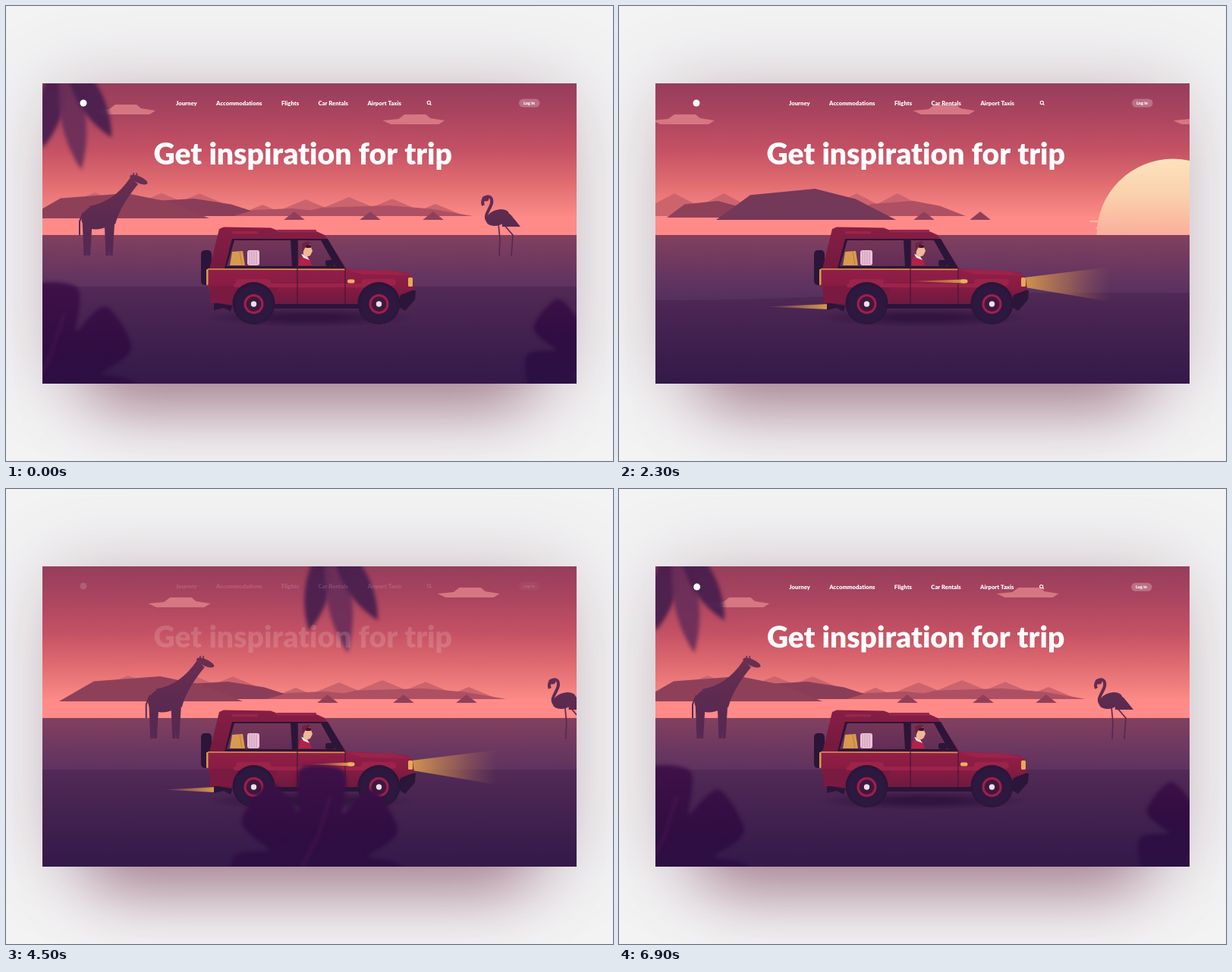
Recreate the animation shown at these times as an HTML page with a canvas. Size 800 by 600 pixels, loop 7 s.

```html
<!DOCTYPE html>
<html lang="en">
<head>
<meta charset="utf-8">
<title>Get inspiration for trip</title>
<style>
html, body { margin: 0; width: 100%; height: 100%; overflow: hidden; background: #f2f2f3; }
canvas { display: block; width: 800px; height: 600px; }
</style>
</head>
<body>
<canvas id="stage" width="800" height="600"></canvas>
<script>
const ctx = document.getElementById('stage').getContext('2d');
const LOOP = 7000, TRIP = 1708, NEAR = 8;

// ---------- helpers ----------
const clamp = v => Math.max(0, Math.min(1, v));
const ramp = (t, a, b) => { const x = clamp((t - a) / (b - a)); return x * x * (3 - 2 * x); };
const mix = (a, b, k) => a + (b - a) * k;
const bell = (x, center, width) => Math.exp(-(((x - center) / width) ** 2));

function gradient(x0, y0, x1, y1, ...colors) {
  const g = ctx.createLinearGradient(x0, y0, x1, y1);
  colors.forEach((c, i) => g.addColorStop(i / (colors.length - 1), c));
  return g;
}
function trace(p) {
  ctx.beginPath();
  for (let i = 0; i < p.length; i += 2) ctx.lineTo(p[i], p[i + 1]);
}
function poly(fill, ...p) {
  trace(p);
  ctx.fillStyle = fill;
  ctx.fill();
}
function line(color, width, ...p) {
  trace(p);
  ctx.strokeStyle = color;
  ctx.lineWidth = width;
  ctx.stroke();
}
function disc(fill, x, y, rx, ry = rx, turn = 0) {
  ctx.beginPath();
  ctx.ellipse(x, y, rx, ry, turn, 0, Math.PI * 2);
  ctx.fillStyle = fill;
  ctx.fill();
}
function box(fill, x, y, w, h, r = 0) {
  ctx.beginPath();
  ctx.roundRect(x, y, w, h, r);
  ctx.fillStyle = fill;
  ctx.fill();
}
function at(x, y, draw) {
  ctx.save();
  ctx.translate(x, y);
  draw();
  ctx.restore();
}
// Draws text and returns its width.
function label(text, x, y, size) {
  ctx.font = `900 ${size}px Lato, sans-serif`;
  ctx.letterSpacing = '0.01px';
  ctx.fillStyle = '#fff';
  ctx.fillText(text, x, y);
  return ctx.measureText(text).width;
}

// ---------- motion ----------
function distance(t) {
  const u = clamp(t / 5015);
  const eased = u + .22 * u * (1 - u) ** 4;
  return TRIP * (1 - Math.cos(Math.PI * eased)) / 2;
}

// ---------- backdrop ----------
function glow(inset, drop, blur, color) {
  ctx.save();
  ctx.shadowColor = color;
  ctx.shadowBlur = blur;
  ctx.shadowOffsetY = drop;
  box('#a06a80', 48 + inset, 102 + inset / 2, 704 - 2 * inset, 396 - inset / 2, 40);
  ctx.restore();
}
function backdrop() {
  ctx.fillStyle = '#f3f3f4';
  ctx.fillRect(0, 0, 800, 600);
  glow(0, 0, 100, 'rgba(125,85,102,.3)');
  glow(62, 34, 84, 'rgba(125,65,90,.56)');
}

function sky() {
  ctx.fillStyle = gradient(0, 102, 0, 277, '#973d5c', '#ab4560', '#c45164', '#e06c71', '#fb8a86');
  ctx.fillRect(48, 102, 704, 175);
  ctx.fillStyle = '#ff8a88';
  ctx.fillRect(48, 277, 704, 25);
}
function sun() {
  ctx.beginPath();
  ctx.arc(1497, 302, 100.5, Math.PI, 0);
  ctx.fillStyle = gradient(0, 200, 0, 302, '#fce3bd', '#fad0ac', '#fbae9b');
  ctx.fill();
  for (const side of [-1, 1]) for (const i of [0, 1]) box(ctx.fillStyle, 1489 + side * (102 - 8 * i), 283 + 9 * i, 16, 2, 1);
}
function clouds(drift) {
  for (let i = 0; i < 7; i++) {
    const x = 156 + 343.3 * i + (i % 5 === 1 ? 38 : 0), y = i % 3 ? 156 : 143;
    at(x - drift, y, () => poly('rgba(226,132,138,.8)', -41, -5, -20, -7, -12, -13, 16, -13, 22, -8, 41, -5, 33, 0, -30, 0));
  }
}

// ---------- far hills ----------
const LIGHT = '#cc646e', RIDGE = '#ae5063', HILL = '#8f4059', DARK = '#743858';

function mound(fill, left, right, top, base) {
  const c = (left + right) / 2, half = (right - left) / 2, h = base - top;
  poly(fill, left, base, c - .62 * half, base - .8 * h, c + .1 * half, top, c + .55 * half, base - .67 * h, right, base);
}
function peak(fill, x, top, base, slope) {
  const half = (base - top) * slope;
  poly(fill, x - half, base, x, top, x + half, base);
}
const rock = x => peak(HILL, x, 271, 282, 1.25);

function homeHills() {
  [117, 205, 255].forEach(x => peak(LIGHT, x, 245 + x / 120, 277, 2.4));
  for (let x = 338; x < 580; x += 57) peak(LIGHT, x, 263 - 11 * Math.sin((x - 330) / 80), 277, 2.4);
  mound('#8a3d59', 130, 345, 254, 277);
  mound(RIDGE, 300, 440, 267, 277);
  mound(RIDGE, 370, 615, 263, 277);
  mound(HILL, 26, 268, 247, 280);
  [380, 480, 563].forEach(rock);
}
function middleHills() {
  [410, 475, 650, 704].forEach(x => peak(LIGHT, x, 247, 277, 1.9));
  mound(HILL, 400, 522, 257, 279);
  mound(RIDGE, 640, 794, 257, 277);
  mound(DARK, 465, 702, 241, 282);
  [739, 813].forEach(rock);
}

// ---------- middle distance ----------
const roadEdge = x => 370 + 8 * ramp(x, 1000, 1500) * (1 - ramp(x, 2950, 3200)) + 10 * bell(x, 1600, 260) + 10 * bell(x, 2640, 190);

function giraffe(fill) {
  disc(fill, 122, 278, 23, 16, -.25);
  ctx.beginPath();
  ctx.moveTo(109, 264);
  ctx.quadraticCurveTo(142, 259, 164, 226);
  ctx.lineTo(174, 235);
  ctx.quadraticCurveTo(150, 264, 144, 288);
  ctx.fill();
  disc(fill, 175, 229, 12.5, 4.5, .42);
  for (const x of [169, 173]) line(fill, 1.6, x, 226, x - 1, 220);
  for (const x of [104.5, 109, 133.5, 138.5]) poly(fill, x - 4, 280, x + 5, 280, x + 2, 329, x - 2, 329);
  line(fill, 2, 102, 272, 97, 284, 97, 302);
}
function flamingo(fill) {
  ctx.beginPath();
  ctx.moveTo(629, 263);
  ctx.bezierCurveTo(624, 250, 643, 246, 640, 260);
  ctx.bezierCurveTo(638, 269, 627, 278, 637, 285);
  ctx.strokeStyle = fill;
  ctx.lineWidth = 4;
  ctx.stroke();
  disc(fill, 632, 254, 4.5, 3.5);
  disc(fill, 648, 279, 16, 10, -.35);
  poly(fill, 652, 268, 665, 275, 678, 291, 654, 291);
  line(fill, 1.7, 649, 287, 651, 308, 650, 330);
  line(fill, 1.7, 655, 287, 668, 302, 666, 330);
}
function tree(x, top, k, fill) {
  box(fill, x - 1.2, top, 2.4, roadEdge(x) - top);
  for (let i = 0; i < 3; i++) {
    const w = (18 + 1.7 * i) * k;
    poly(fill, x, top + 30 * i * k, x + w, top + (48 + 29.5 * i) * k, x - w, top + (48 + 29.5 * i) * k);
  }
}
function wildlife() {
  const fill = gradient(0, 225, 0, 350, '#6a2e50', '#5a2a50', '#522753');
  [0, 2 * TRIP].forEach(x => at(x, 0, () => { giraffe(fill); flamingo(fill); }));
  at(1510, 0, () => { ctx.scale(-1, 1); giraffe(fill); });
  for (const [x, drop] of [[966, 0], [2575, 15]]) {
    tree(x, 237 + drop, 1, fill);
    tree(x + (drop ? 55 : 43), 280 + drop / 8, .7, fill);
  }
  box('#55284d', 3081.5, 290, 3, 86);
  box('#572846', 3051, 271.5, 45, 21.5, 3);
  box('#673052', 3079, 304, 41, 20, 3);
}
function road(shift) {
  ctx.beginPath();
  ctx.moveTo(48, 500);
  for (let x = 48; x <= 756; x += 6) ctx.lineTo(x, roadEdge(x + shift));
  ctx.lineTo(756, 500);
  ctx.fillStyle = gradient(0, 368, 0, 498, '#532a56', '#42214f', '#33194a');
  ctx.fill();
}

// ---------- car ----------
const INK = '#2b1538', GOLD = '#d89b4e', SEAM = '#451638', TRIM = '#9c234a';

function wheel(x, roll) {
  const y = 393;
  disc(INK, x, y - 1, 28);
  disc('#2d183f', x, y, 24.5);
  ctx.setLineDash([4, 2.4]);
  ctx.lineDashOffset = -roll;
  ctx.beginPath();
  ctx.arc(x, y, 25, 0, Math.PI * 2);
  ctx.strokeStyle = '#2d183f';
  ctx.lineWidth = 2.2;
  ctx.stroke();
  ctx.setLineDash([]);
  disc('#a11f4a', x, y, 13);
  disc('#40183f', x, y, 10);
  disc('#ebe0e8', x, y, 3.7);
}
function luggage() {
  poly(GOLD, 298, 324, 312, 323, 315, 342, 295, 342);
  line('#b87b42', 1, 308, 324, 311, 341);
  box('#e9c3d6', 318, 322, 16, 20, 3);
  for (let x = 321; x < 333; x += 3) line('#c38aad', .8, x, 323, x, 341);
}
function driver(tilt) {
  poly('#b52049', 385, 342, 388, 330, 400, 333, 403, 342);
  poly('#f4e6ea', 389, 327, 396, 329, 400, 335, 392, 332);
  at(395, 328, () => {
    ctx.rotate(-tilt * .3);
    poly('#f0b896', -4, -14, 5, -15, 9, -5, 6, 1, 1, 3, -3, 1);
    poly('#742040', -5, -15, 3, -18, 7, -15, -1, -9, -4, -3);
    box('#3c1737', 0, -13, 7, 4, 1.5);
  });
}
function taper(tip, x, y, half, from, to) {
  poly(gradient(tip, 0, x, 0, from, to), x, y - half, tip, y, x, y + half);
}
function cabin(tilt) {
  poly(gradient(0, 292, 0, 347, '#861e45', '#74193f'), 268, 347, 281, 294, 287, 291.5, 349, 292.5, 358, 296, 410, 297.5, 420, 302, 449, 347);
  for (const [x, y, w] of [[298, 297, 34], [357, 295, 52]]) box('#98264b', x, y, w, 3.6, 1);
  poly(INK, 298, 307, 424, 307, 447, 346, 288, 346);
  const glass = gradient(0, 308, 0, 344, '#753658', '#612d57');
  poly(glass, 301, 309, 375, 309, 377, 343, 291, 343);
  poly(glass, 385, 309, 415, 309, 434, 343, 385, 343);
  luggage();
  driver(tilt);
  box(INK, 421, 335, 12, 8, 3);
}
function body() {
  poly(gradient(0, 346, 0, 394, '#921f47', '#881b42', '#6c1a40'), 266, 346, 447, 346, 510, 349, 530, 352, 536, 358, 538, 374, 520, 381, 515, 395, 298, 395, 274, 391, 266, 369);
  poly(TRIM, 448, 347, 510, 349, 533, 355, 470, 354);
  box('#7a1a41', 269, 369, 88, 23, 2);
  box(TRIM, 300, 366, 205, 5, 2);
  for (const x of [326, 491]) box(TRIM, x - 23, 360, 46, 9, 5);
  line(GOLD, 1.5, 266, 347, 447, 347.5);
  box(GOLD, 264, 347, 2.5, 21, 1);
  for (const [x, top] of [[384, 308], [447, 346]]) line(SEAM, 1.2, x, top, x, 394);
  box(INK, 353, 393, 113, 6, 1);
}
function car(roll, beam, tail, streak, tilt) {
  const shade = ctx.createRadialGradient(0, 0, 40, 0, 0, 140);
  shade.addColorStop(0, 'rgba(40,14,55,.7)');
  shade.addColorStop(1, 'rgba(40,14,55,0)');
  at(400, 411, () => { ctx.scale(1, .09); disc(shade, 0, 0, 140); });

  ctx.globalAlpha = beam;
  poly(gradient(534, 0, 648, 0, 'rgba(222,160,78,.9)', 'rgba(200,135,80,.5)', 'rgba(170,100,85,0)'), 535, 358, 648, 344, 648, 390, 535, 371);
  ctx.globalAlpha = 1;
  taper(276 - tail, 276, 396.5, 3.5, 'rgba(220,150,80,.1)', GOLD);

  box(INK, 257, 322, 14, 46, 5);
  poly(INK, 274, 388, 300, 390, 296, 403, 287, 398, 274, 401);
  poly(INK, 520, 374, 540, 375, 539, 387, 526, 402, 518, 397);
  cabin(tilt);
  body();
  wheel(326.5, roll);
  wheel(491.5, roll);
  box('#e7a958', 530, 358, 6, 12, 1.5);
  taper(456 - streak, 456, 363, 2.4, 'rgba(220,160,79,.15)', GOLD);
  box('#e7b064', 450, 360.5, 9.5, 5, 2.3);
}

// ---------- foreground leaves ----------
const PLUM = 'rgba(106,46,90,.92)', DUSK = 'rgba(74,31,78,.94)', NIGHT = 'rgba(62,27,74,.92)';

// A fan of blades hanging from above the window.
function frond(x, count, lean, spread, width) {
  for (let i = 0; i < count; i++) {
    const k = 2 * i / (count - 1) - 1, reach = 162 - 28 * Math.abs(k);
    at(x, 56, () => {
      ctx.rotate(-lean - k * spread / 2);
      ctx.beginPath();
      ctx.moveTo(0, 0);
      ctx.quadraticCurveTo(width, reach * .55, 0, reach);
      ctx.quadraticCurveTo(-width, reach * .55, 0, 0);
      ctx.fillStyle = width < 20 ? NIGHT : Math.abs(k) === 1 ? DUSK : PLUM;
      ctx.fill();
    });
  }
}
function monstera(x, y, rx, ry) {
  const lobe = a => 1 - .42 * Math.abs(Math.cos(3.5 * a + .6)) ** 14;
  ctx.beginPath();
  for (let a = 0; a < Math.PI * 2; a += .03) ctx.lineTo(x + rx * lobe(a) * Math.cos(a), y + ry * lobe(a) * Math.sin(a));
  ctx.fillStyle = gradient(x, y - ry, x, y + ry * .3, '#3f1149', '#300d42', '#2b1044');
  ctx.fill();
  line('rgba(100,30,95,.45)', 3, x - rx * .3, y + ry * .2, x, y - ry * .3, x + rx * .15, y - ry * .7);
}
function foliage(s, part) {
  const show = (world, draw) => {
    const x = world - NEAR * s;
    if (x > -200 && x < 1000) draw(x);
  };
  ctx.save();
  ctx.filter = 'blur(2.5px)';
  for (const lap of [0, NEAR * TRIP]) {
    show(75 + lap, x => frond(x - 5 * part, 3, .15, .7, 33));
    show(60 + lap, x => monstera(x - 38 * part, 498 + 10 * part, 114, 134));
    show(778 + lap, x => monstera(x + 9 * part, 470 + 12 * part, 94, 102));
  }
  show(1374, x => frond(x, 4, -.15, 1.2, 33));
  show(3696, x => frond(x, 5, -.02, 1.25, 26));
  show(9497, x => frond(x, 6, -.1, 1.75, 11));
  show(12038, x => frond(x, 5, -.1, 1.6, 14));
  show(1862, x => monstera(x, 432, 82, 60));
  show(4083, x => monstera(x, 484, 96, 110));
  show(9034, x => monstera(x, 498, 66, 124));
  show(12463, x => monstera(x, 492, 92, 105));
  ctx.restore();
}

// ---------- page header and phone ----------
function header() {
  disc('#fff', 102, 128, 4.5);
  let x = 224;
  for (const item of ['Journey', 'Accommodations', 'Flights', 'Car Rentals', 'Airport Taxis']) x += label(item, x, 130.6, 7.7) + 25.4;
  ctx.beginPath();
  ctx.arc(557.3, 127.4, 2.1, 0, Math.PI * 2);
  ctx.strokeStyle = '#fff';
  ctx.lineWidth = 1.1;
  ctx.stroke();
  line('#fff', 1.2, 558.8, 129, 560.4, 130.6);
  box('rgba(255,255,255,.25)', 676, 122.5, 27.5, 11, 5.5);
  label('Log in', 682, 130, 5.5);
  label('Get inspiration for trip', 194.5, 208.5, 39.1);
}
function phone(alpha) {
  ctx.globalAlpha = alpha;
  disc('#efb394', 758, 150, 12, 24);
  box(gradient(60, 130, 320, 290, 'rgba(104,68,108,.8)', 'rgba(74,42,88,.92)', 'rgba(54,30,78,.97)'), 39, 88, 714, 430, 62);
  ctx.beginPath();
  ctx.roundRect(46, 95, 700, 416, 55);
  ctx.strokeStyle = gradient(260, 0, 480, 0, 'rgba(52,18,52,0)', '#35133a');
  ctx.lineWidth = 14;
  ctx.stroke();
  box('rgba(132,92,130,.35)', 45, 186, 16, 160, 8);
  ctx.globalAlpha = 1;
}
function page(t) {
  if (t < 4700) {
    ctx.globalAlpha = 1 - ramp(t, 4200, 4600);
    header();
    ctx.globalAlpha = 1;
    return;
  }
  const zoom = ramp(t, 5300, LOOP), rise = 1 - clamp((t - 4700) / 600), tilt = (1 - zoom) ** 1.3;
  ctx.save();
  ctx.translate(mix(172, 102, zoom), 128 + 275 * (1 - zoom) ** 1.2 + 200 * rise ** 3);
  ctx.transform(mix(.716, 1, zoom), .136 * tilt, -.25 * tilt, mix(.7, 1, zoom), 0, 0);
  ctx.translate(-102, -128);
  phone(1 - ramp(t, 5700, 6600));
  header();
  ctx.restore();
}

// ---------- scene ----------
function scene(t) {
  const s = distance(t), settle = ramp(t, 5300, LOOP), off = 1 - ramp(t, 4300, 5100);
  ctx.save();
  ctx.beginPath();
  ctx.rect(48, 102, 704, 396);
  ctx.clip();
  sky();
  at(-s, 0, sun);
  clouds(s * .988 + 28 * settle);
  at(-s, 0, homeHills);
  at(430 - s, 0, middleHills);
  at(TRIP - s, 0, homeHills);
  ctx.fillStyle = gradient(0, 302, 0, 390, '#83405f', '#6a3760', '#53305e');
  ctx.fillRect(48, 302, 704, 196);
  road(2 * s);
  at(-2 * s, 0, wildlife);
  car(2 * s, ramp(t, 100, 700) * (1 - ramp(t, 4700, 5900)), 80 * ramp(t, 600, 1500) * off,
    75 * ramp(t, 1200, 2400) * off, ramp(t, 4800, 5200) * (1 - ramp(t, 5900, 6700)));
  foliage(s, ramp(t, 4600, 5200) * (1 - settle));
  page(t);
  ctx.restore();
}

backdrop();
const still = document.createElement('canvas');
still.width = 800;
still.height = 600;
still.getContext('2d').drawImage(ctx.canvas, 0, 0);

function frame() {
  ctx.drawImage(still, 0, 0);
  scene(performance.now() % LOOP);
  requestAnimationFrame(frame);
}
frame();
</script>
</body>
</html>
```
